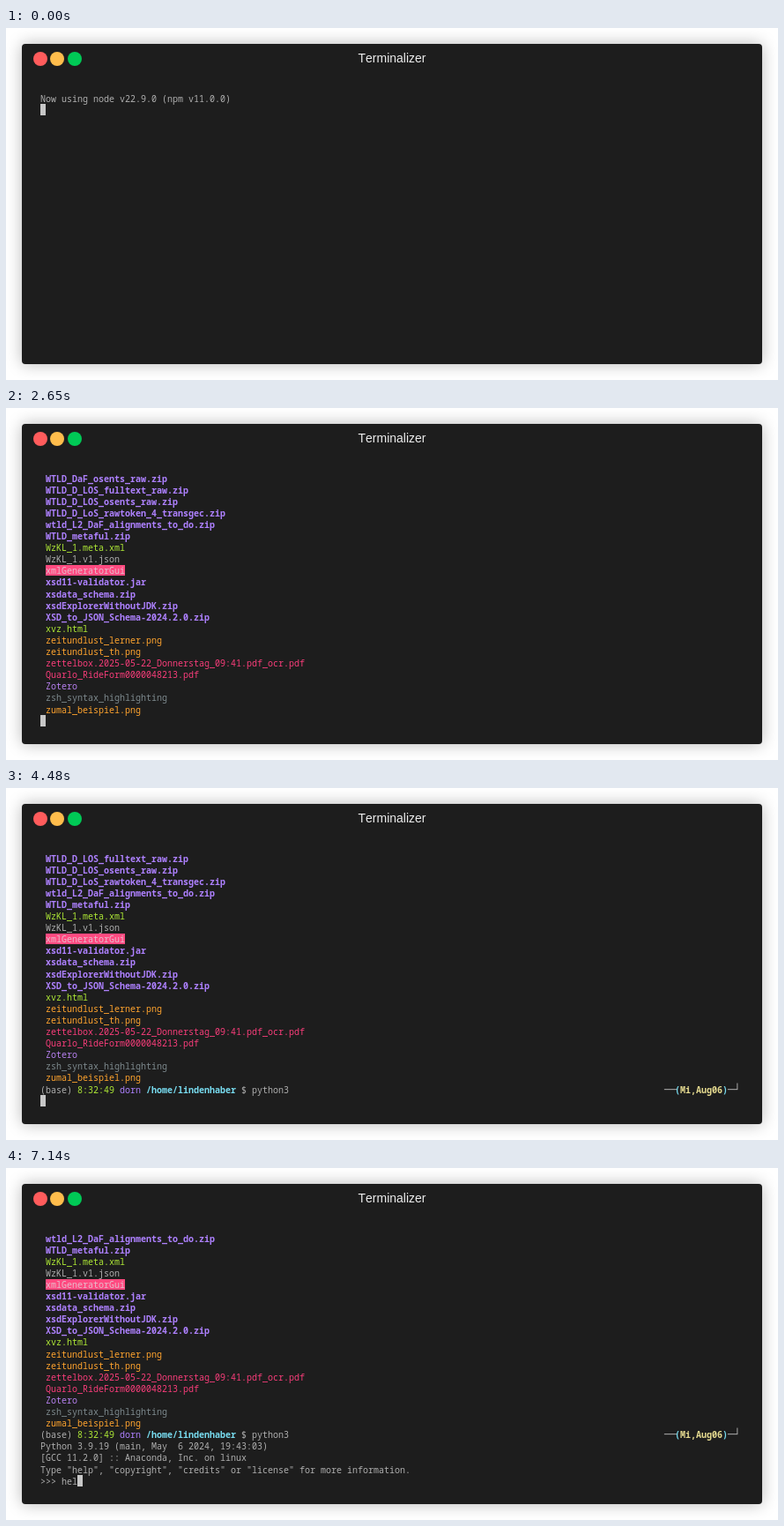
These frames come from a looping animation (876x399 px, 8 s). An HTML page:

```html
<!DOCTYPE html>
<html lang="en">
<head>
<meta charset="utf-8">
<title>Terminal session</title>
<style>
html, body { margin: 0; width: 100%; height: 100%; overflow: hidden; background: #fff; }
.window {
  position: absolute; left: 18px; top: 18px; width: 840px; height: 363px;
  border-radius: 4px; background: #1d1d1d; box-shadow: 0 0 18px rgba(0, 0, 0, .28);
}
.dot { position: absolute; top: 9px; width: 16px; height: 16px; border-radius: 50%; }
.title {
  position: absolute; left: 0; right: 0; top: 8px; text-align: center;
  font: 14px/16px "Liberation Sans", Arial, sans-serif; font-kerning: none; color: #ececec;
}
#screen {
  position: absolute; left: 21px; top: 55.3px; width: 792px;
  font: 10px/13.1px "Noto Sans Mono", "DejaVu Sans Mono", monospace;
  color: #afafaf; white-space: pre; font-variant-ligatures: none;
}
.row { position: absolute; left: 0; height: 13.1px; }
.row > span {
  display: inline-block; box-sizing: border-box; height: 12.4px;
  padding-top: .25px; vertical-align: top;
}
.row .right { position: absolute; left: 708px; top: 0; }
.rule { display: inline-block; width: 12px; font: 12px/13.1px "DejaVu Sans Mono", monospace; }
.zip { color: #ae81ff; font-weight: 700; }
.doc { color: #aee836; }
.img { color: #ffa42e; }
.pdf { color: #f83d7a; }
.link { color: #b780f0; }
.dim { color: #7d898d; }
.alert { color: #e6bccb; background: #ff4a80; }
.time1 { color: #b6c93a; }
.host1 { color: #a9b8e2; }
.time2 { color: #aee836; }
.host2 { color: #ae81ff; }
.path { color: #78dcf0; font-weight: 700; }
.date { color: #e6db90; font-weight: 700; }
.ghost { color: #5f6468; }
.cursor { color: #1d1d1d; background: #c7c7c7; }
</style>
</head>
<body>
<div class="window">
  <div class="dot" style="left:13px;background:#ff5c5c"></div>
  <div class="dot" style="left:32.4px;background:#ffbd4c"></div>
  <div class="dot" style="left:51.7px;background:#00ca56"></div>
  <div class="title">Terminalizer</div>
  <div id="screen"></div>
</div>
<script>
const LOOP = 8000, ROWS = 22, PITCH = 13.1;
const screenEl = document.getElementById('screen');

// A row is a list of [class, text] parts.
const plain = text => [['', text]];

const files = [
  ['zip', 'WTLD_DaF_osents_raw.zip'],
  ['zip', 'WTLD_D_LOS_fulltext_raw.zip'],
  ['zip', 'WTLD_D_LOS_osents_raw.zip'],
  ['zip', 'WTLD_D_LoS_rawtoken_4_transgec.zip'],
  ['zip', 'wtld_L2_DaF_alignments_to_do.zip'],
  ['zip', 'WTLD_metaful.zip'],
  ['doc', 'WzKL_1.meta.xml'],
  ['', 'WzKL_1.v1.json'],
  ['alert', 'xmlGeneratorGui'],
  ['zip', 'xsd11-validator.jar'],
  ['zip', 'xsdata_schema.zip'],
  ['zip', 'xsdExplorerWithoutJDK.zip'],
  ['zip', 'XSD_to_JSON_Schema-2024.2.0.zip'],
  ['doc', 'xvz.html'],
  ['img', 'zeitundlust_lerner.png'],
  ['img', 'zeitundlust_th.png'],
  ['pdf', 'zettelbox.2025-05-22_Donnerstag_09:41.pdf_ocr.pdf'],
  ['pdf', 'Quarlo_RideForm0000048213.pdf'],
  ['link', 'Zotero'],
  ['dim', 'zsh_syntax_highlighting'],
  ['img', 'zumal_beispiel.png']
].map(file => [['', ' '], file]);

const banner = [
  'Python 3.9.19 (main, May  6 2024, 19:43:03)',
  '[GCC 11.2.0] :: Anaconda, Inc. on linux',
  'Type "help", "copyright", "credits" or "license" for more information.'
].map(plain);

const hello = plain('Now using node v22.9.0 (npm v11.0.0)');

const prompt = (n, clock, typed) => [
  ['', '(base) '], ['time' + n, clock], ['', ' '], ['host' + n, 'dorn'], ['', ' '],
  ['path', '/home/lindenhaber'], ['', ' $ ' + typed]
];

// Adds the cursor, which covers the first letter of a suggestion.
const withCursor = (row, hint = '') =>
  [...row, ['cursor', hint[0] || ' '], ['ghost', hint.slice(1)]];

const first = (typed, hint) => [hello, withCursor(prompt(1, '8:32:45', typed), hint)];
const second = (typed, hint) => [...files, withCursor(prompt(2, '8:32:49', typed), hint)];
const launched = [...files, prompt(2, '8:32:49', 'python3')];
const repl = typed => [...launched, ...banner, withCursor(plain('>>> ' + typed))];
const blank = withCursor([]);

const steps = [
  [0, [hello, blank]],
  [220, first('')],
  [2220, first('l', 'h')],
  [2350, first('ls')],
  [2550, [hello, prompt(1, '8:32:45', 'ls'), blank]],
  [2610, [...files, blank]],
  [2670, second('')],
  [3480, second('p', 'wd')],
  ...[3610, 3830, 3880, 3940, 4120, 4190].map((at, i) =>
    [at, second('python3'.slice(0, i + 2), 'python3'.slice(i + 2))]),
  [4480, [...launched, blank]],
  [4540, [...launched, ...banner, blank]],
  [4600, repl('')],
  [6600, repl('h')],
  [6780, repl('he')],
  [7140, repl('hel')]
];

function span([cls, text]) {
  const el = document.createElement('span');
  el.className = cls;
  el.textContent = text;
  return el;
}

function rightPrompt() {
  const el = span(['right', '']);
  const parts = [['rule', '──'], ['path', '('], ['date', 'Mi,Aug06'], ['path', ')'], ['rule', '─┘']];
  el.append(...parts.map(span));
  return el;
}

function draw(rows) {
  screenEl.replaceChildren(...rows.slice(-ROWS).map((parts, i) => {
    const row = document.createElement('div');
    row.className = 'row';
    row.style.top = i * PITCH + 'px';
    row.append(...parts.filter(part => part[1]).map(span));
    if (parts.some(part => part[0] === 'path')) row.append(rightPrompt());
    return row;
  }));
}

let shown = -1;
const start = performance.now();
function tick() {
  const t = (performance.now() - start) % LOOP;
  const now = steps.filter(step => step[0] <= t).length - 1;
  if (now !== shown) draw(steps[shown = now][1]);
  requestAnimationFrame(tick);
}
tick();
</script>
</body>
</html>
```
